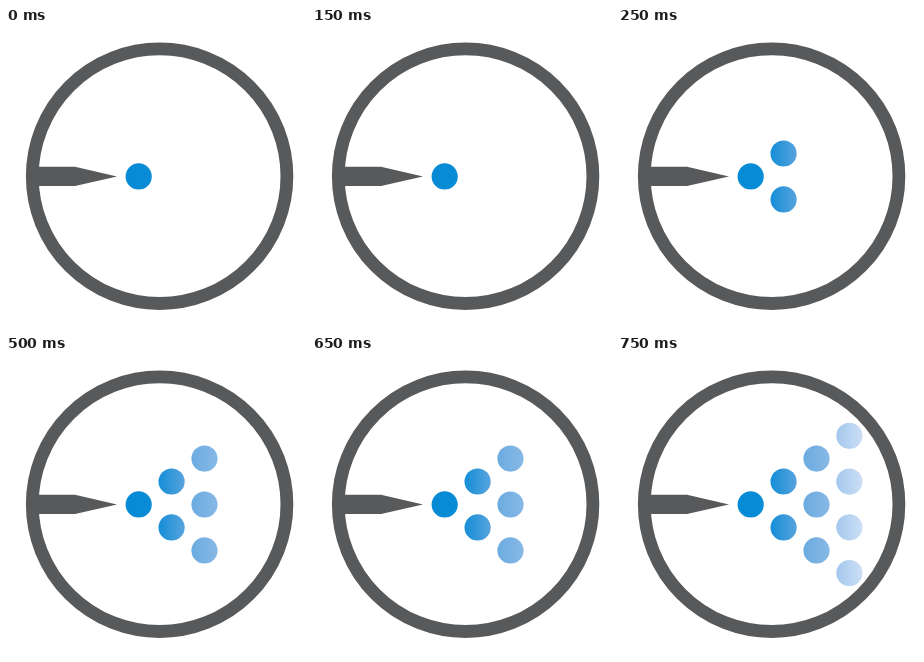
These frames come from a looping animation (300 by 300 pixels, 1000 ms). An HTML page:

```html
<!DOCTYPE html>
<html lang="en">
<head>
<meta charset="utf-8">
<title>Spray nozzle</title>
<style>
  html, body { margin: 0; width: 100%; height: 100%; overflow: hidden; background: #fff; }
  svg { display: block; width: 100vw; height: 100vh; }
  .dots { fill: url(#fade); }
  .col2, .col3, .col4 { animation: 1s step-end infinite; }
  .col2 { animation-name: second; }
  .col3 { animation-name: third; }
  .col4 { animation-name: fourth; }
  @keyframes second { 0% { opacity: 0; } 25%, 100% { opacity: 1; } }
  @keyframes third { 0% { opacity: 0; } 50%, 100% { opacity: 1; } }
  @keyframes fourth { 0% { opacity: 0; } 75%, 100% { opacity: 1; } }
</style>
</head>
<body>
<svg viewBox="0 0 300 300">
  <defs>
    <linearGradient id="fade" gradientUnits="userSpaceOnUse" x1="120" y1="0" x2="245" y2="0">
      <stop offset="0" stop-color="#058ad5"/>
      <stop offset=".21" stop-color="#0a8cd6"/>
      <stop offset=".26" stop-color="#148ed7"/>
      <stop offset=".47" stop-color="#58a3dd"/>
      <stop offset=".52" stop-color="#6aabe0"/>
      <stop offset=".74" stop-color="#88b9e6"/>
      <stop offset=".78" stop-color="#a2c7ed"/>
      <stop offset="1" stop-color="#cddff5"/>
    </linearGradient>
  </defs>
  <circle cx="153.6" cy="148.2" r="127.3" fill="none" stroke="#58595b" stroke-width="12.8"/>
  <path d="M27 138.8H69L111 148.5L69 158.1H27Z" fill="#58595b"/>
  <g class="dots">
    <circle cx="132.7" cy="148.4" r="13.1"/>
    <g class="col2">
      <circle cx="165.6" cy="125.5" r="13.1"/>
      <circle cx="165.6" cy="171.4" r="13.1"/>
    </g>
    <g class="col3">
      <circle cx="198.5" cy="102.6" r="13.1"/>
      <circle cx="198.5" cy="148.5" r="13.1"/>
      <circle cx="198.5" cy="194.4" r="13.1"/>
    </g>
    <g class="col4">
      <circle cx="231.4" cy="79.8" r="13.1"/>
      <circle cx="231.4" cy="125.6" r="13.1"/>
      <circle cx="231.4" cy="171.3" r="13.1"/>
      <circle cx="231.4" cy="217" r="13.1"/>
    </g>
  </g>
</svg>
</body>
</html>
```
